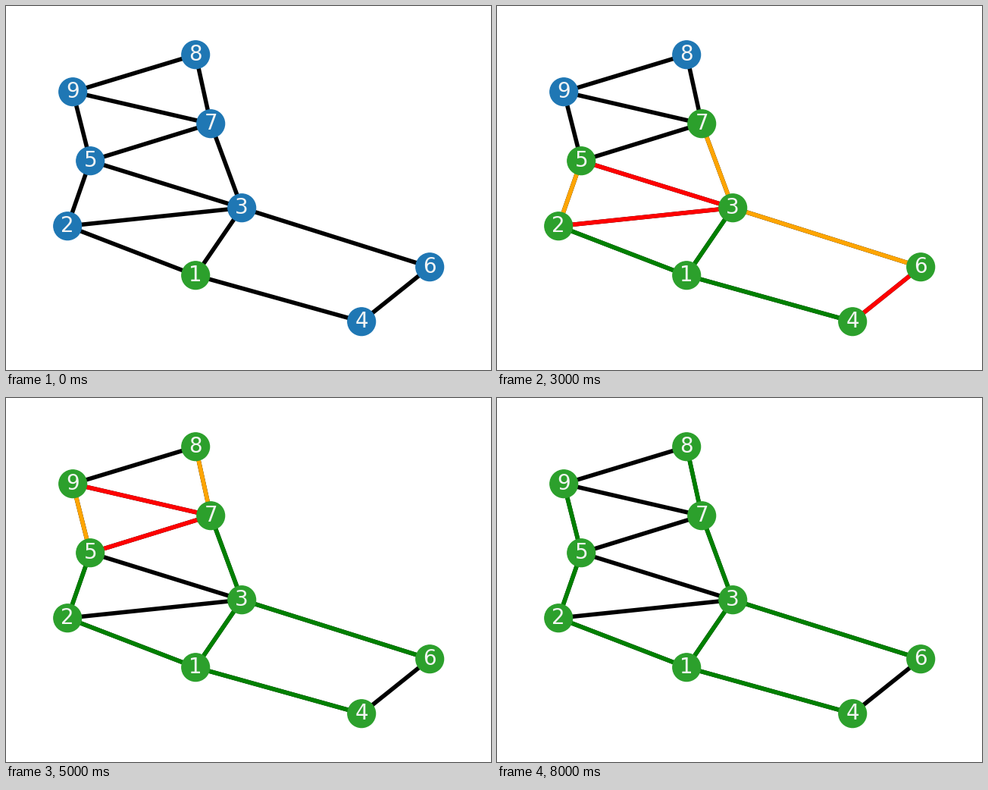
Recreate the animation shown at these times as a matplotlib script. Size 640 by 480 pixels, loop 9 s.

```python
from itertools import pairwise

import matplotlib.pyplot as plt
from matplotlib.animation import FuncAnimation
from matplotlib.collections import LineCollection

W, H, DPI = 640, 480, 100
STEP_MS = 1000
IDLE, REACHED = "tab:blue", "tab:green"

# Node centres in pixels, in order of their labels 1 to 9.
CENTRES = [(250, 355), (81, 290), (311, 266), (469, 416), (111, 204),
           (559, 344), (270, 155), (250, 64), (88, 113)]
POS = dict(enumerate(CENTRES, start=1))

# A strip of triangles, closed off by one detour on the right.
STRIP, DETOUR = (1, 2, 3, 5, 7, 9, 8), (1, 4, 6, 3)
LINKS = [*pairwise(STRIP), *zip(STRIP, STRIP[2:]), *pairwise(DETOUR)]
EDGES = sorted(tuple(sorted(link)) for link in LINKS)


def bfs_steps(root):
    """Two steps per layer: probe the open edges, then commit the accepted ones."""
    reached, tried, tree, layer = {root}, set(), [], [root]
    steps = [(set(reached), {})]
    while layer:
        accepted, rejected, fresh = [], [], []
        for u in layer:
            for edge in EDGES:
                if u not in edge or edge in tried:
                    continue
                tried.add(edge)
                v = sum(edge) - u
                if v in reached:
                    rejected.append(edge)
                else:
                    reached.add(v)
                    fresh.append(v)
                    accepted.append(edge)
        probe = dict.fromkeys(tree, "green")
        probe.update(dict.fromkeys(rejected, "red"))
        probe.update(dict.fromkeys(accepted, "orange"))
        tree += accepted
        steps.append((set(reached), probe))
        steps.append((set(reached), dict.fromkeys(tree, "green")))
        layer = fresh
    return steps


STEPS = bfs_steps(1)

fig = plt.figure(figsize=(W / DPI, H / DPI), dpi=DPI, facecolor="white")
ax = fig.add_axes((0, 0, 1, 1))
nudge = 0.2  # keeps labels clear of half-pixel rounding
ax.set(xlim=(-nudge, W - nudge), ylim=(H - nudge, -nudge))
ax.axis("off")

lines = ax.add_collection(LineCollection([], linewidths=4, zorder=1))
nodes = ax.scatter(*zip(*CENTRES), s=700, c=[IDLE] * len(POS),
                   linewidths=1, zorder=2)
for name, (x, y) in POS.items():
    ax.text(x, y, str(name), color="whitesmoke", fontsize=20,
            family="DejaVu Sans", ha="center", va="center", zorder=3)


def update(i):
    reached, marked = STEPS[i]
    strokes = [(edge, "black") for edge in EDGES] + list(marked.items())
    lines.set_segments([[POS[u], POS[v]] for (u, v), _ in strokes])
    lines.set_color([color for _, color in strokes])

    colors = [REACHED if n in reached else IDLE for n in POS]
    nodes.set_facecolor(colors)
    nodes.set_edgecolor(colors)
    return lines, nodes


anim = FuncAnimation(fig, update, frames=len(STEPS), interval=STEP_MS,
                     repeat=True, repeat_delay=0, blit=False)
plt.show()
```
